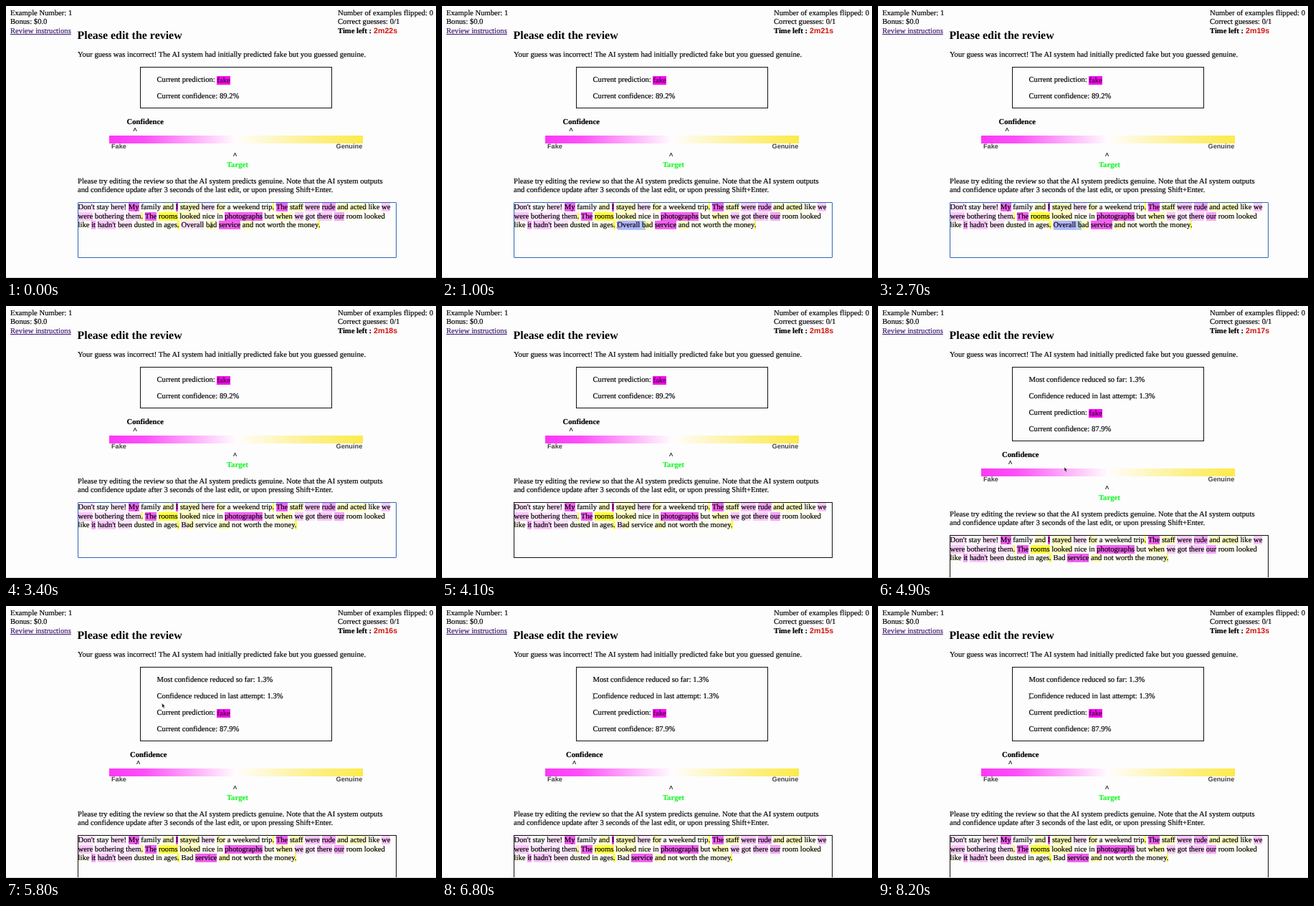
Recreate the animation shown at these times as an HTML page. Size 600 px wide and 380 px high, loop 8300 ms.

```html
<!DOCTYPE html>
<html lang="en">
<head>
<meta charset="utf-8">
<title>Edit the review</title>
<style>
html, body { margin: 0; width: 100%; height: 100%; overflow: hidden; background: #fdfdfd; }
#stage {
  position: relative; width: 600px; height: 380px; overflow: hidden; background: #fdfdfd; color: #000;
  font: 10.65px/13px "Liberation Serif", Times, serif; text-rendering: geometricPrecision;
}
#stage p, #stage h2, #stage div, #stage svg { position: absolute; margin: 0; box-sizing: border-box; }
#stage p, #stage h2 { white-space: pre; }
p { -webkit-text-stroke: .18px currentColor; }
#low, #mark, #now, #gain { left: 0; top: 0; width: 600px; height: 380px; }
h2 { font: bold 15.95px/20px "Liberation Serif", Times, serif; }
u { color: #3c1a70; }
.sans { font-family: "Liberation Sans", Arial, sans-serif; font-weight: bold; -webkit-text-stroke: 0; }
.end { font-size: 9.2px; color: #444; }
.fake { background: #f40cec; color: #3c003a; padding: .5px 0; }
#box { left: 187px; top: 85px; width: 268px; height: 58px; border: 1.3px solid #111; }
#bar {
  left: 144px; top: 181px; width: 354px; height: 11px;
  background: linear-gradient(90deg, #fc38f6, #fd50f8 14%, #fffdfd 50%, #fdf08a 80%, #fdea48);
}
#area { left: 100px; top: 274px; width: 445px; height: 78px; border: 1.4px solid #2c68b8; border-radius: 1px; }
.blur #area { border: 1.3px solid #111; border-radius: 0; }
.late #box { height: 104px; }
.late #low, .late #now { transform: translateY(46px); }
.late #mark { transform: translateX(4.5px); }
#gain { visibility: hidden; }
.late #gain { visibility: visible; }
#stage #sel { top: 300px; height: 12.5px; background: #b3cbff; mix-blend-mode: multiply; }
#foot { left: 0; top: 379px; width: 600px; height: 1px; background: #d4d4d4; }
i { font-style: normal; padding: .5px 0; }
.a { background: #fce4fc; } .b { background: #f9c8f9; } .c { background: #f5a5f7; }
.d { background: #f262f0; } .e { background: #ea44e8; }
.w { background: #fffff0; } .x { background: #ffffc0; } .z { background: #ffff3c; }
</style>
</head>
<body>
<div id="stage">
  <p style="left:6px;top:4px">Example Number: 1</p>
  <p style="left:6px;top:16px">Bonus: $0.0</p>
  <p style="left:6px;top:29px"><u>Review instructions</u></p>
  <p style="left:463px;top:4px">Number of examples flipped: 0</p>
  <p style="left:463px;top:16px">Correct guesses: 0/1</p>
  <p style="left:463px;top:29px"><b>Time left :</b></p>
  <p id="clock" class="sans" style="left:513px;top:29px;color:#d0140e">2m22s</p>
  <h2 style="left:99.5px;top:32px">Please edit the review</h2>
  <p style="left:100px;top:62px">Your guess was incorrect! The AI system had initially predicted fake but you guessed genuine.</p>

  <div id="box"></div>
  <div id="gain">
    <p style="left:210.5px;top:97px">Most confidence reduced so far: 1.3%</p>
    <p style="left:210.5px;top:120px">Confidence reduced in last attempt: 1.3%</p>
  </div>
  <div id="now">
    <p style="left:210.5px;top:97px">Current prediction: <span class="fake">fake</span></p>
    <p style="left:210.5px;top:120px">Current confidence: <span id="conf">89.2%</span></p>
  </div>

  <div id="low">
    <div id="bar"></div>
    <div id="mark">
      <p style="left:168.5px;top:156px"><b>Confidence</b></p>
      <p style="left:177px;top:168px"><b>^</b></p>
    </div>
    <p class="sans end" style="left:147px;top:190px">Fake</p>
    <p class="sans end" style="left:460.5px;top:190px">Genuine</p>
    <p style="left:316.5px;top:203px"><b>^</b></p>
    <p style="left:308px;top:216px;color:#1cf52c"><b>Target</b></p>
    <p style="left:100px;top:239px">Please try editing the review so that the AI system predicts genuine. Note that the AI system outputs</p>
    <p style="left:100px;top:251px">and confidence update after 3 seconds of the last edit, or upon pressing Shift+Enter.</p>
    <p id="l1" style="left:100.5px;top:274.7px"></p>
    <p id="l2" style="left:100.5px;top:287.2px"></p>
    <p id="l3" style="left:100.5px;top:299.6px"></p>
    <div id="sel"></div>
    <div id="area"></div>
  </div>
  <div id="foot"></div>

  <svg id="arrow" width="8" height="10" viewBox="0 0 8 10" style="left:0;top:0">
    <path d="M1 1V7.2L2.5 5.9L3.5 8.3L4.6 7.8L3.6 5.5H5.5Z" fill="#111" stroke="#fff" stroke-width=".5"/>
  </svg>
  <svg id="beam" width="6" height="10" viewBox="-3 -5 6 10" style="left:0;top:0">
    <path d="M-1.5 -4Q0 -4 0 -3Q0 -4 1.5 -4M0 -3V3M-1.5 4Q0 4 0 3Q0 4 1.5 4" fill="none" stroke="#555" stroke-width=".8"/>
  </svg>
</div>
<script>
const LOOP = 8300, STEP = 100;
const EDIT = 2900, BLUR = 3500, UPDATE = 4300;
const $ = id => document.getElementById(id);

// [kWord] wraps a word in highlight class k; n is plain
const paint = s => s.replace(/\[(\w)([^\]]+)\]/g, '<i class="$1">$2</i>');
const start = "[wlike] [cit] [bhadn't] [abeen] [wdusted] [win] [wages][z.] ";
const finish = " [xand] [wnot] [wworth] [wthe] [wmoney][z.]";
const endings = [
  "[aOverall] [xbad] [dservice]",
  "[aB][xad] [wservice]",
  "[wBad] [dservice]"
].map(s => paint(start + s + finish));

$("l1").innerHTML = paint("[aDon't] [nstay] [ahere!] [dMy] [nfamily] [xand] [eI] [xstayed] [ahere] [xfor] [wa] [wweekend] " +
  "[wtrip][z.] [dThe] [xstaff] [bwere] [crude] [xand] [xacted] [wlike] [bwe]");
$("l2").innerHTML = paint("[bwere] [abothering] [athem][z.] [dThe] [zrooms] [xlooked] [wnice] [win] [dphotographs] " +
  "[wbut] [xwhen] [bwe] [agot] [bthere] [cour] [wroom] [wlooked]");

// Pointer paths: [time, x, y]
const drag = [[0, 286.5, 306], [300, 284, 306], [900, 245, 306], [2600, 245, 306]];
const leave = [[4400, 256, 300], [4800, 260, 228], [5100, 260, 228], [6000, 211.5, 126], [LOOP, 211.5, 126]];

function along(path, t) {
  const k = path.findIndex(p => p[0] > t);
  if (k < 1) return null;
  const [t0, x0, y0] = path[k - 1], [t1, x1, y1] = path[k];
  const u = (t - t0) / (t1 - t0), e = u * u * (3 - 2 * u);
  return [x0 + (x1 - x0) * e, y0 + (y1 - y0) * e];
}

function place(el, pos, dx, dy) {
  el.style.display = pos ? "" : "none";
  if (pos) el.style.transform = `translate(${pos[0] - dx}px,${pos[1] - dy}px)`;
}

let phase = -1;
function draw(t) {
  const late = t >= UPDATE, next = late ? 2 : t >= EDIT ? 1 : 0;
  if (next !== phase) $("l3").innerHTML = endings[phase = next];
  $("stage").className = (late ? "late " : "") + (t >= BLUR ? "blur" : "");
  $("conf").textContent = late ? "87.9%" : "89.2%";
  $("clock").textContent = `2m${22 - Math.floor((t + 800) / 1000)}s`;

  const p = along(drag, t), q = along(leave, t);
  const from = p ? p[0] : 245;
  $("sel").style.display = t >= 300 && t < EDIT ? "" : "none";
  $("sel").style.left = from - .5 + "px";
  $("sel").style.width = Math.max(0, 284.3 - from) + "px";

  const text = p || (q && q[1] < 132 ? q : null);
  place($("beam"), text, 3, 5);
  place($("arrow"), text ? null : q, 1, 4);
}

function tick() {
  draw(Math.floor(performance.now() % LOOP / STEP) * STEP);
  requestAnimationFrame(tick);
}
tick();
</script>
</body>
</html>
```
